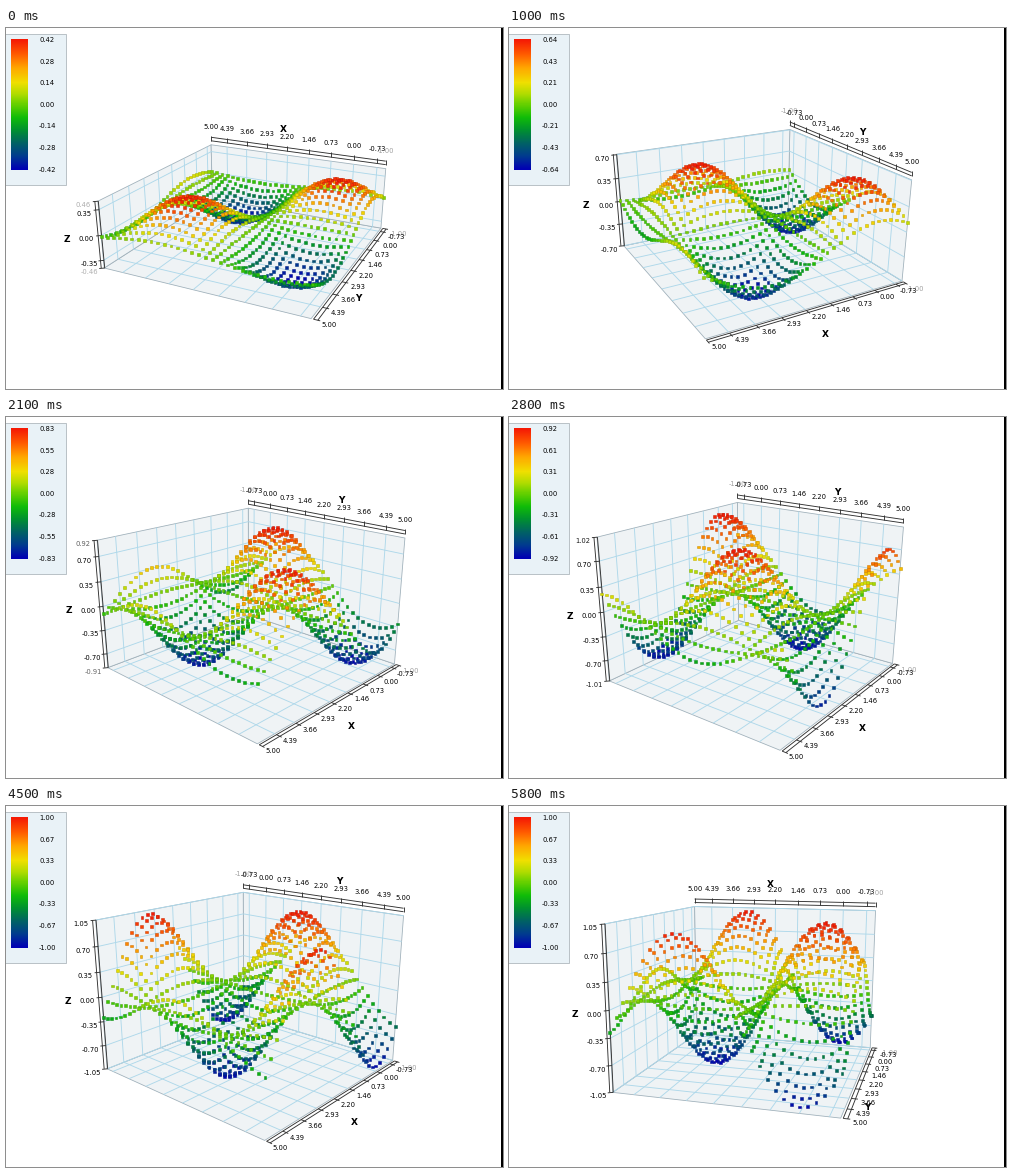
A matplotlib script that plays this animation: 497x361 px, repeating every 5.9 s.

```python
import numpy as np
import matplotlib.pyplot as plt
from matplotlib.animation import FuncAnimation
from matplotlib.collections import LineCollection, PolyCollection
from matplotlib.colors import LinearSegmentedColormap
from matplotlib.patches import Rectangle

W, H, DPI = 497, 361, 64
FRAMES, STEP = 59, 100
PT = 72 / DPI                      # points per pixel

plt.rcParams["font.family"] = "DejaVu Sans"
fig = plt.figure(figsize=(W / DPI, H / DPI), dpi=DPI, facecolor="white")
ax = fig.add_axes([0, 0, 1, 1])

RAINBOW = LinearSegmentedColormap.from_list("rainbow", [
    (0.00, "#0000b4"), (0.10, "#003a90"), (0.20, "#006066"), (0.30, "#009030"),
    (0.40, "#10bc08"), (0.50, "#64d000"), (0.58, "#b0dc00"), (0.67, "#f0e000"),
    (0.78, "#ffa800"), (0.89, "#ff5a00"), (1.00, "#f51a05")])

# Camera: box half side is 1, centre of the view in pixels
CX, CY, SCALE, NEAR, KZ = 246, 188, 105, 0.163, 0.70
CAM_T = [0, 1.0, 2.1, 2.6, 4.4, 5.0, 5.8]
AZIMUTH = [154, 209, 226.7, 233, 233, 209, 163.5]
ELEVATION = [22, 22, 20, 20, 20, 10.5, 12]

# The wave travels along y until the data stops
WAVE_T = [0, 1.0, 2.1, 2.8, 3.7, 4.2]
WAVE_Y = [3.59, 0.69, -2.12, -3.93, -6.3, -7.33]

TICKS = np.array([-1, -0.73, 0, 0.73, 1.46, 2.2, 2.93, 3.66, 4.39, 5])
ZSTEP = 0.35
GX, GY = np.meshgrid(np.linspace(-1, 5, 31), np.linspace(-1, 5, 31))


def unit(v):
    return (v - 2) / 3


class Camera:
    def __init__(self, t):
        self.az = np.interp(t, CAM_T, AZIMUTH)
        th = np.radians(self.az)
        ph = np.radians(np.interp(t, CAM_T, ELEVATION))
        self.ct, self.st = np.cos(th), np.sin(th)
        self.cp, self.sp = np.cos(ph), np.sin(ph)

    def __call__(self, a, b, z):
        """Screen x, y and depth of a point on the unit base at data height z."""
        a, b, z = np.broadcast_arrays(a, b, np.asarray(z) * KZ)
        side = a * self.ct - b * self.st
        away = a * self.st + b * self.ct
        depth = 1 + NEAR * (away * self.cp - z * self.sp)
        u = CX + SCALE * side / depth
        v = CY - SCALE * (z * self.cp + away * self.sp) / depth
        return u, v, depth

    def path(self, *pts):
        u, v, _ = self(*np.array(pts, float).T)
        return np.column_stack([u, v])


def label(x, y, text, ha="center", shade=0.0, size=6.8, weight="normal"):
    ax.text(x, y, text, ha=ha, va="center", color=str(shade),
            fontsize=size * PT, fontweight=weight)


def title(x, y, text):
    label(x, y, text, size=9, weight="bold")


def lines(segs, color, width):
    ax.add_collection(LineCollection(segs, colors=color, linewidths=width * PT))


def fmt(v):
    return f"{v:.2f}" if abs(v) > 0.004 else "0.00"


def tick_shade(v):
    return 0.63 if v == -1 else 0.0


def z_ticks(top):
    n = int((top + 1e-6) / ZSTEP)
    return [k * ZSTEP for k in range(-n, n + 1)]


def draw_box(cam, wall, top, bot):
    floor = [(-1, -1, -bot), (1, -1, -bot), (1, 1, -bot), (-1, 1, -bot)]
    side_x = [(wall, -1, -bot), (wall, 1, -bot), (wall, 1, top), (wall, -1, top)]
    side_y = [(-1, -1, -bot), (1, -1, -bot), (1, -1, top), (-1, -1, top)]
    faces = [cam.path(*f) for f in (floor, side_x, side_y)]
    ax.add_collection(PolyCollection(faces, facecolors="#eff3f5",
                                     edgecolors="#9fb0ba", linewidths=0.8 * PT))
    grid = []
    for c in unit(TICKS[1:-1]):
        grid += [cam.path((c, -1, -bot), (c, 1, -bot)),
                 cam.path((-1, c, -bot), (1, c, -bot)),
                 cam.path((wall, c, -bot), (wall, c, top)),
                 cam.path((c, -1, -bot), (c, -1, top))]
    for z in z_ticks(top):
        grid += [cam.path((wall, -1, z), (wall, 1, z)),
                 cam.path((-1, -1, z), (1, -1, z))]
    lines(grid, "#aed8ea", 0.9)


def draw_points(cam, t, amp):
    z = -amp * np.cos(GX) * np.cos(GY - np.interp(t, WAVE_T, WAVE_Y))
    u, v, depth = (p.ravel() for p in cam(unit(GX), unit(GY), z))
    order = np.argsort(-depth)
    rgba = RAINBOW((z.ravel()[order] / amp + 1) / 2)
    edge = rgba.copy()
    edge[:, :3] *= 0.8
    ax.scatter(u[order], v[order], s=(2.8 * PT) ** 2, marker="s", c=rgba,
               edgecolors=edge, linewidths=0.5 * PT, zorder=3)


def draw_top_axis(cam, name, place, top):
    ends = cam.path((*place(-1), top), (*place(1), top))
    segs = [ends - [0, dy] for dy in (4, 7.5)]
    for val in TICKS:
        (p,) = cam.path((*place(unit(val)), top))
        segs.append([p - [0, 4], p - [0, 9]])
        label(p[0], p[1] - 18, fmt(val), shade=tick_shade(val))
    lines(segs, "#303030", 0.9)
    (p,) = cam.path((*place(0.2), top))
    title(p[0] + 7, p[1] - 24, name)


def draw_floor_axis(cam, name, place, bot):
    segs = [cam.path((*place(-1, e), -bot), (*place(1, e), -bot))
            for e in (0.02, 0.055)]
    p, q = cam.path((*place(-1), -bot), (*place(1), -bot))
    nx, ny = np.abs((q - p)[::-1]) / np.hypot(*(q - p))
    off = np.array([11.5 + 8 * nx, 3 + 5 * ny])
    for val in TICKS:
        c = unit(val)
        segs.append(cam.path((*place(c, 0.02), -bot), (*place(c, 0.075), -bot)))
        (p,) = cam.path((*place(c), -bot))
        label(*(p + off), fmt(val), shade=tick_shade(val))
    lines(segs, "#303030", 0.9)
    (p,) = cam.path((*place(unit(2.2)), -bot))
    title(*(p + off + ([6, 17] if name == "X" else [-8, 23])), name)


def draw_z_axis(cam, corner, top, bot):
    edge = cam.path((*corner, -bot), (*corner, top))
    segs = [edge + [dx, 0] for dx in (-3, 0.5)]
    marks = [(z, 0.0) for z in z_ticks(top)]
    last = marks[-1][0]
    if top - last > 0.03:
        marks += [(v, np.clip(1 - (abs(v) - last) / ZSTEP, 0, 0.7))
                  for v in (top, -bot)]
    for z, shade in marks:
        (p,) = cam.path((*corner, z))
        segs.append([p + [-5, 0.5], p + [0.5, 0]])
        label(p[0] - 14.5, p[1] + 4, fmt(z), shade=shade)
    lines(segs, "#303030", 0.9)
    (p,) = cam.path((*corner, 0))
    title(p[0] - 34, p[1] + 4, "Z")


def draw_legend(amp):
    ax.add_patch(Rectangle((-1, 5.5), 61, 151, facecolor="#e9f2f7",
                           edgecolor="#b4bcc2", linewidth=0.9 * PT))
    ax.imshow(np.linspace(1, 0, 131)[:, None], cmap=RAINBOW, vmin=0, vmax=1,
              extent=(5, 22, 142, 11), aspect="auto", zorder=2)
    for k in range(7):
        label(33, 12 + 21.6 * k, fmt(amp * (1 - k / 3)), ha="left")


def draw(i):
    t = i * STEP / 1000
    amp = np.sin(0.433 + 0.262 * min(t, 4.2))
    top, bot = min(1.105 * amp, 1.05), min(1.095 * amp, 1.05)
    cam = Camera(t)
    ax.clear()
    ax.axis("off")

    # Axes keep to the outer edges, so they swap when the box turns
    def along_x(c, e=0, b=1):
        return c, b * (1 + e)

    def along_y(c, e=0):
        return -1 - e, c

    turned = cam.az > 180
    draw_box(cam, -1 if turned else 1, top, bot)
    draw_points(cam, t, amp)
    if turned:
        draw_top_axis(cam, "Y", along_y, top)
        draw_floor_axis(cam, "X", along_x, bot)
        draw_z_axis(cam, (1, -1), top, bot)
    else:
        draw_top_axis(cam, "X", lambda c: along_x(c, b=-1), top)
        draw_floor_axis(cam, "Y", along_y, bot)
        draw_z_axis(cam, (1, 1), top, bot)
    draw_legend(amp)
    ax.add_patch(Rectangle((495, 0), 2, H, color="black", linewidth=0, zorder=5))
    ax.set_xlim(0, W)
    ax.set_ylim(H, 0)
    return []


anim = FuncAnimation(fig, draw, frames=FRAMES, interval=STEP, repeat=True,
                     init_func=lambda: [])
plt.show()
```
